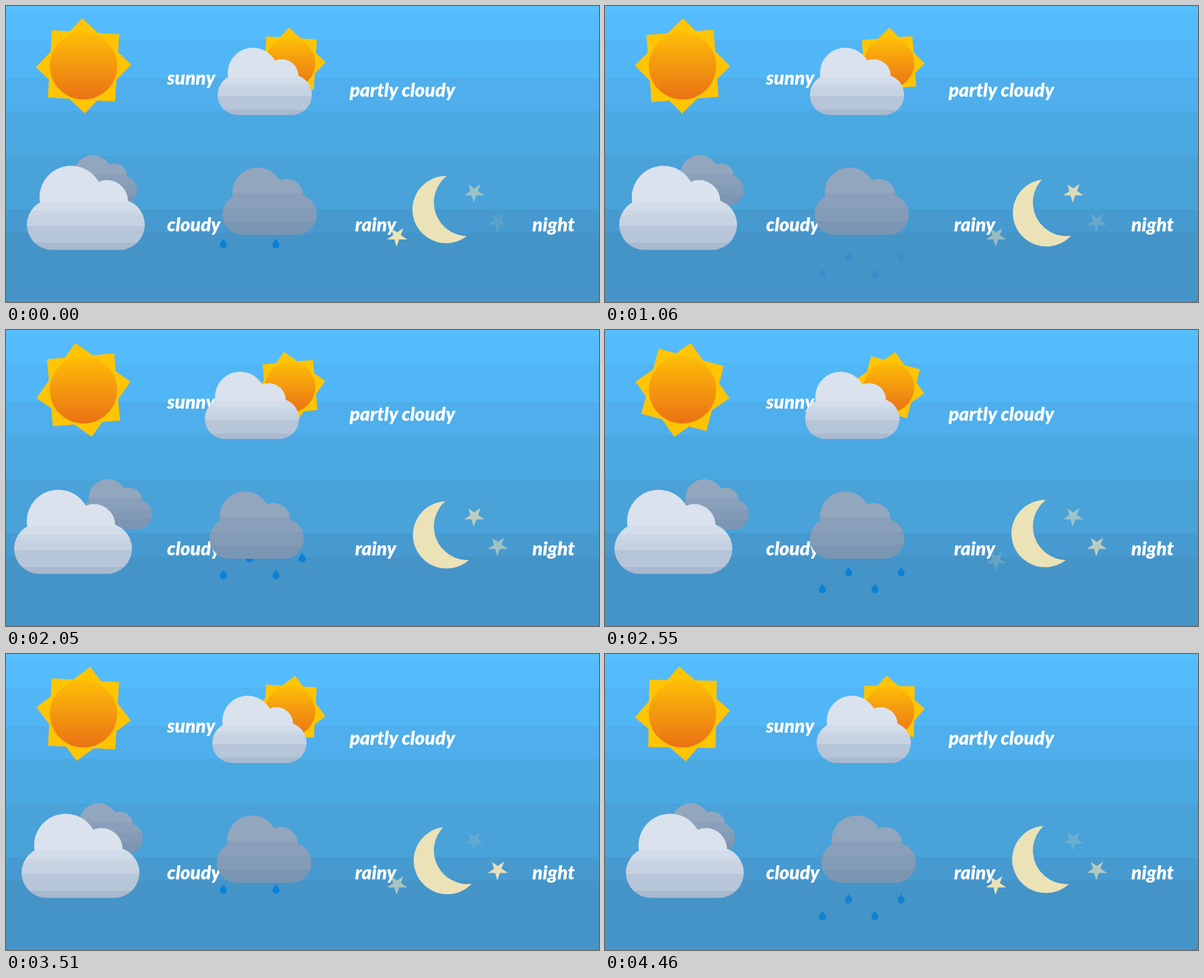
An HTML page that plays this animation: 880x440 px, repeating every 4.56 s.

```html
<!DOCTYPE html>
<html lang="en">
<head>
<meta charset="utf-8">
<title>Weather icons</title>
<style>
  html, body { margin: 0; width: 100%; height: 100%; overflow: hidden; background: #4594c8; }
  svg { display: block; width: 880px; height: 440px; }
  text { font: italic 900 28px Lato, "Open Sans", sans-serif; fill: #fff; }
</style>
</head>
<body>
<svg id="stage" viewBox="0 0 880 440"></svg>
<script>
const LOOP = 4560, LAST = 4460;
const stage = document.getElementById("stage");

function add(parent, tag, attrs = {}) {
  const el = document.createElementNS("http://www.w3.org/2000/svg", tag);
  for (const key in attrs) el.setAttribute(key, attrs[key]);
  parent.appendChild(el);
  return el;
}

const group = (parent, x = 0, y = 0, scale = 1) =>
  add(parent, "g", { transform: `translate(${x} ${y}) scale(${scale})` });

function gradient(id, y1, y2, stops) {
  const grad = add(defs, "linearGradient",
    { id, x1: 0, x2: 0, y1, y2, gradientUnits: "userSpaceOnUse" });
  for (const [offset, color] of stops) add(grad, "stop", { offset, "stop-color": color });
}

// Vertical gradient in flat steps; each step is [start, colour].
function bands(id, y1, y2, steps) {
  gradient(id, y1, y2, steps.flatMap(([start, color], i) =>
    [[start, color], [i + 1 < steps.length ? steps[i + 1][0] : 1, color]]));
}

const defs = add(stage, "defs");
bands("sky", 0, 440, [
  [0, "#56c0ff"], [.023, "#54bcfc"], [.114, "#51b6f5"], [.243, "#4eafec"],
  [.355, "#4ba9e2"], [.505, "#49a2d8"], [.686, "#479acf"], [.766, "#4594c8"]
]);
gradient("disc", -50, 50, [[0, "#fdbe06"], [.5, "#f4970f"], [1, "#ea7214"]]);
bands("light", 0, 100, [
  [0, "#dae2ee"], [.44, "#d3dde9"], [.53, "#ccd7e5"], [.59, "#c6d2e1"],
  [.72, "#b6c5d8"], [.92, "#a9b9d0"]
]);
bands("dark", 0, 100, [
  [0, "#92a6be"], [.38, "#8aa0ba"], [.6, "#829bb6"], [.8, "#7b96b3"]
]);

function label(x, y, text) {
  add(stage, "text", { x, y }).textContent = text;
}

function sun(x, y, scale) {
  const g = group(stage, x, y, scale);
  const rays = add(g, "g");
  for (const turn of [45, 5]) {
    add(rays, "rect", { x: -50, y: -50, width: 100, height: 100,
      fill: "#ffc505", transform: `rotate(${turn})` });
  }
  add(g, "circle", { r: 50, fill: "url(#disc)" });
  return rays;
}

function cloud(y, scale, shade) {
  const outer = add(stage, "g");
  const g = group(outer, 0, y, scale);
  const fill = `url(#${shade})`;
  add(g, "rect", { y: 40, width: 140, height: 60, rx: 30, fill });
  add(g, "circle", { cx: 52.5, cy: 37.5, r: 37.5, fill });
  add(g, "circle", { cx: 95, cy: 42, r: 25, fill });
  return outer;
}

function star(x, y) {
  return add(group(stage, x, y), "path", {
    d: "M-15 4L15 4L-8.7 -12.2L-1 15.1L9.3 -13Z", fill: "#ebe2b8"
  });
}

add(stage, "rect", { width: 880, height: 440, fill: "url(#sky)" });

const bigSun = sun(115, 89, 1);
label(239, 117, "sunny");

const smallSun = sun(421.5, 85, .75);
const partly = cloud(62, 1, "light");
label(510, 135, "partly cloudy");

const rear = cloud(221.5, .75, "dark");
const front = cloud(237.5, 1.25, "light");
label(239, 335, "cloudy");

const drops = add(stage, "g", { fill: "#0a80d6" });
for (const [x, y] of [[322.5, 0], [361.5, -25], [400.5, 0], [439.5, -25]]) {
  add(group(drops, x, y), "path", {
    d: "M0-7C1.6-3.6 5.3-1.4 5.3 1.7A5.3 5.3 0 0 1-5.3 1.7C-5.3-1.4-1.6-3.6 0-7Z"
  });
}
const rainy = cloud(240, 1, "dark");
label(518, 335, "rainy");

const moon = add(group(stage, 685, 292), "path", {
  d: "M-16.8-47.1A50 50 0 1 0-16.8 47.1A50 50 0 0 1-16.8-47.1Z", fill: "#ebe2b8"
});
const stars = [
  { el: star(695, 277.5), keys: [[0, .5], [1330, 1], [3850, 0], [4460, .2]] },
  { el: star(730, 321.5), keys: [[0, .12], [750, .08], [3400, 1], [4460, .66]] },
  { el: star(580.5, 343), keys: [[0, 1], [2100, 0], [4400, 1], [4460, 1]] }
];
label(781, 335, "night");

const clamp = (v, lo, hi) => Math.min(hi, Math.max(lo, v));

function lerpKeys(keys, t) {
  const i = clamp(keys.findIndex(k => k[0] >= t), 1, keys.length - 1);
  const [t0, v0] = keys[i - 1], [t1, v1] = keys[i];
  return v0 + (v1 - v0) * (t - t0) / (t1 - t0);
}

const move = (el, x, y = 0) => el.setAttribute("transform", `translate(${x} ${y})`);
const spin = (el, deg) => el.setAttribute("transform", `rotate(${deg})`);

function draw(t) {
  spin(bigSun, .0398 * t - 1.6);
  spin(smallSun, .0398 * t - 1.6);

  // Clouds drift left and back, snapping to whole pixels.
  const drift = Math.round(clamp(.0092 * Math.abs(t - 2175), 1, 20));
  move(partly, 294 + drift);
  move(front, 11 + drift);
  move(rainy, 301 + drift);
  move(rear, 112.6 - .0107 * Math.abs(t - 2150));

  const fall = (t + 672) % 1800 / 1800;
  move(drops, 0, 325 + 75 * fall);
  drops.setAttribute("opacity", clamp(6 * Math.min(fall, 1 - fall), 0, 1));

  spin(moon, -23.3 - 5 * Math.cos((t - 1310) / 2530 * 2 * Math.PI));
  for (const { el, keys } of stars) el.setAttribute("opacity", lerpKeys(keys, t));
}

const start = performance.now();
function tick() {
  draw(Math.min((performance.now() - start) % LOOP, LAST));
  requestAnimationFrame(tick);
}
tick();
</script>
</body>
</html>
```
